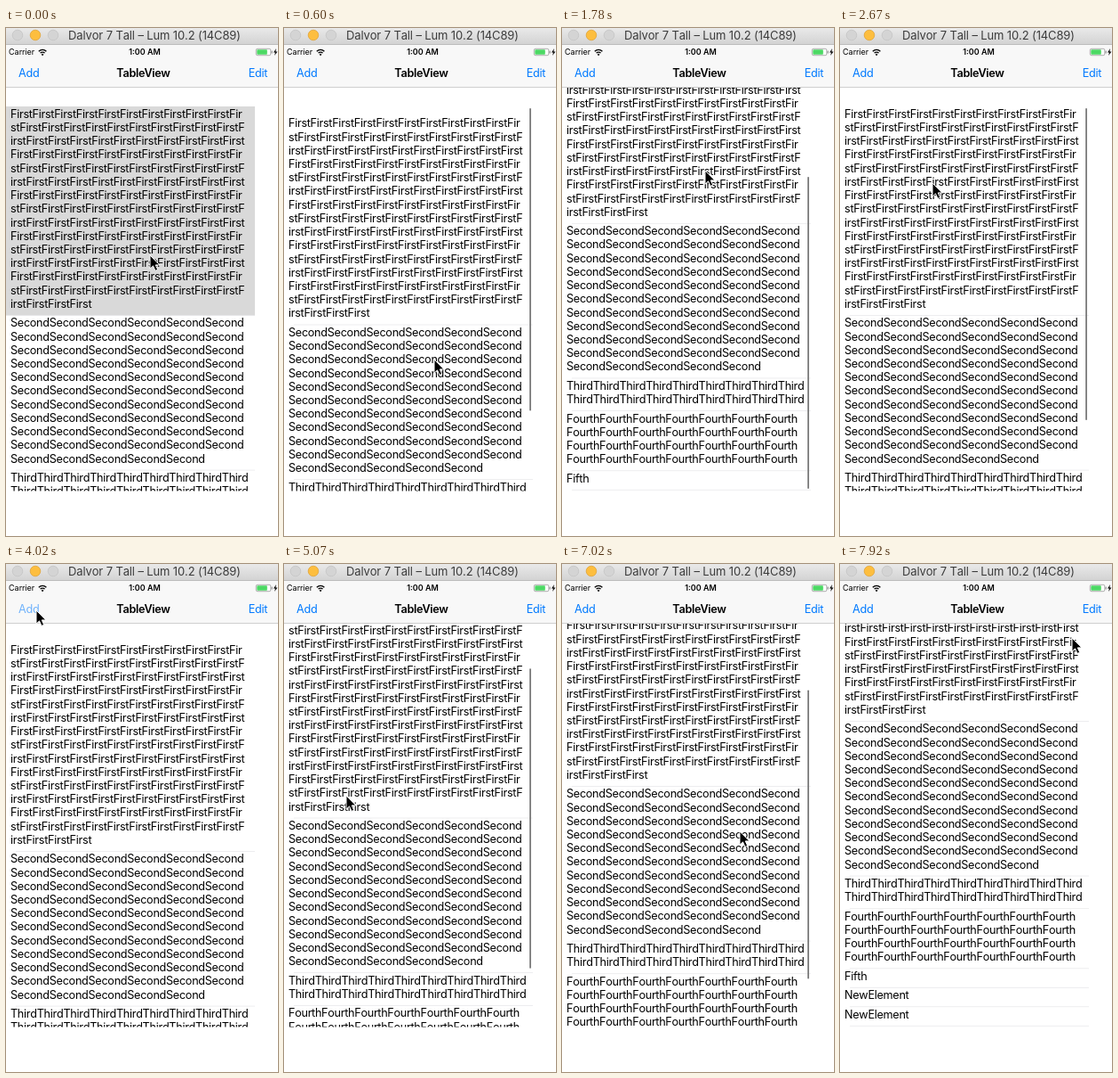
An HTML page that plays this animation: 306x570 px, repeating every 8 s.

```html
<!DOCTYPE html>
<html lang="en">
<head>
<meta charset="utf-8">
<title>TableView</title>
<style>
  html, body { margin: 0; width: 100%; height: 100%; overflow: hidden; background: #fff; }
  svg { display: block; width: 306px; height: 570px; }
  text { font-family: Inter, "Open Sans", sans-serif; font-size: 12.7px; letter-spacing: -0.025em; font-kerning: none; fill: #000; }
  .blue { fill: #007aff; }
  .small { font-size: 9px; letter-spacing: 0; }
  .title { font-size: 13px; letter-spacing: -0.01em; fill: #3c3c3c; }
</style>
</head>
<body>
<svg viewBox="0 0 306 570">
  <defs>
    <linearGradient id="chrome" x2="0" y2="1">
      <stop stop-color="#e9e9e9"/><stop offset="1" stop-color="#d2d2d2"/>
    </linearGradient>
    <clipPath id="viewport"><rect y="67" width="306" height="452.5"/></clipPath>
  </defs>
  <rect width="306" height="570" fill="#fff"/>

  <g clip-path="url(#viewport)">
    <g id="table"></g>
    <rect id="indicator" x="276.2" width="1.75" rx="0.8" fill="#777"/>
  </g>

  <rect y="19" width="306" height="47" fill="#f8f8f8"/>
  <rect y="66" width="306" height="1" fill="#cfcfcf"/>
  <rect width="306" height="19" fill="url(#chrome)"/>
  <rect y="18" width="306" height="1" fill="#bcbcbc"/>
  <g stroke-width="0.7">
    <circle cx="13" cy="8" r="5.8" fill="#d4d4d4" stroke="#c2c2c2"/>
    <circle cx="33" cy="8" r="5.8" fill="#fdbe3f" stroke="#dfa032"/>
    <circle cx="53" cy="8" r="5.8" fill="#d4d4d4" stroke="#c2c2c2"/>
  </g>
  <text class="title" x="167" y="13" text-anchor="middle">Dalvor 7 Tall – Lum 10.2 (14C89)</text>

  <text class="small" x="3" y="30.3">Carrier</text>
  <g fill="none" stroke="#000" stroke-width="1.3">
    <path d="M36.8 26.2a6 6 0 0 1 8.6 0M38.6 28.1a3.5 3.5 0 0 1 5 0"/>
    <circle cx="41.1" cy="29.8" r="0.5"/>
  </g>
  <text class="small" x="156" y="30.3" text-anchor="middle" font-weight="600">1:00 AM</text>
  <rect x="281.3" y="23.3" width="16.5" height="7.4" rx="1.6" fill="#fff" stroke="#777" stroke-width="0.6"/>
  <rect x="282.3" y="24.3" width="11.5" height="5.4" rx="0.8" fill="#4cd964"/>
  <rect x="298.6" y="25.6" width="1" height="2.8" rx="0.5" fill="#777"/>
  <path d="M304 23l-3 4.5h2l-1 3.5 3.4-4.6h-2.1z"/>

  <text id="add" class="blue" x="14" y="55.2">Add</text>
  <text x="154.5" y="55.2" text-anchor="middle" font-weight="600" style="font-kerning:normal">TableView</text>
  <text class="blue" x="294" y="55.2" text-anchor="end">Edit</text>

  <path id="pointer" d="M0 0V15.2L3.5 11.9L6 17.4L8.7 16.2L6.3 10.9H11Z" stroke="#fff" stroke-linejoin="round"/>
</svg>
<script>
const $ = id => document.getElementById(id);
const TOP = 88, BOTTOM = 518.4, LINE = 15.22, PAD = 6.25, LOOP = 8000;

// word, repetitions, characters per line (cycled)
const rows = [
  ['First', 153, [53, 53, 54]],
  ['Second', 65, [36]],
  ['Third', 18, [45]],
  ['Fourth', 28, [42]],
  ['Fifth', 1, [5]],
  ['NewElement', 1, [10]],
  ['NewElement', 1, [10]]
];

function node(parent, tag, attrs) {
  const el = document.createElementNS('http://www.w3.org/2000/svg', tag);
  set(el, attrs);
  return parent.appendChild(el);
}

function set(el, attrs) {
  for (const key in attrs) el.setAttribute(key, attrs[key]);
}

function wrap(word, count, lengths) {
  const lines = [];
  for (let rest = word.repeat(count); rest;) {
    const n = lengths[lines.length % lengths.length];
    lines.push(rest.slice(0, n));
    rest = rest.slice(n);
  }
  return lines;
}

let height = 0;
const cells = rows.map(row => {
  const lines = wrap(...row), h = lines.length * LINE + PAD;
  const group = node($('table'), 'g', { transform: `translate(0 ${height})` });
  const back = node(group, 'rect', { width: 280, height: h, fill: 'none' });
  lines.forEach((line, i) => {
    node(group, 'text', { x: 5, y: 12.8 + i * LINE }).textContent = line;
  });
  node(group, 'rect', { x: 11, y: h - 0.5, width: 269, height: 0.7, fill: '#e6e6e8' });
  height += h;
  return { group, back, end: height };
});

const clamp = v => Math.min(1, Math.max(0, v));
const ease = f => (1 - Math.cos(Math.PI * f)) / 2;
const ramp = (t, from, to) => ease(clamp((t - from) / (to - from)));
const bump = (t, from, to) => Math.sin(Math.PI * clamp((t - from) / (to - from)));
const within = (t, from, to) => t >= from && t < to;

function stepAt(ms) {
  const step = ms < 3720 ? (ms + 8) / 148.75 : 25 + (ms - 3720) / 150;
  return Math.floor(step);
}

// Turning points of the pointer: step, x, y
const turns = [
  [0, 162, 255], [4, 169, 372], [6, 163, 29], [12, 161, 160], [15, 140, 330], [18, 104, 174],
  [27, 34, 52], [34, 70, 260], [39, 21, 23], [43, 34, 52], [47, 200, 300], [53, 261, 83]
];

function pointerAt(step) {
  const next = Math.max(1, turns.findIndex(turn => turn[0] >= step));
  const [from, x0, y0] = turns[next - 1], [to, x1, y1] = turns[next];
  const f = ramp(step, from, to);
  return [x0 + (x1 - x0) * f, y0 + (y1 - y0) * f];
}

function draw(ms) {
  const step = stepAt(ms);
  const count = step < 28 ? 5 : step < 43 ? 6 : 7;
  const lowest = BOTTOM - TOP - cells[Math.min(count, 6) - 1].end - ramp(step, 42, 44) * (LINE + PAD);

  // 0 is the top of the list, 1 its end
  const progress = ramp(step, 5, 8) - ramp(step, 12, 18) + ramp(step, 28, 30)
    - 0.7 * bump(step, 32, 36) - 0.5 * bump(step, 45, 49);
  const pull = 15 * bump(step, 1, 5);

  set($('table'), { transform: `translate(0 ${TOP + progress * lowest + pull})` });
  cells.forEach((cell, i) => set(cell.group, { visibility: i < count ? 'visible' : 'hidden' }));
  set(cells[0].back, { fill: step < 1 ? '#d9d9d9' : 'none' });

  const size = 434 * (BOTTOM - TOP) / cells[count - 1].end - pull;
  const shown = (from, to) => ramp(step, from, from + 1) - ramp(step, to, to + 2);
  set($('indicator'), {
    y: 90 + progress * (427 - size),
    height: size,
    opacity: shown(1, 18) + shown(31, 37) + shown(44, 51)
  });

  const pressed = within(step, 26, 28) || within(step, 41, 43);
  set($('add'), { opacity: pressed ? 0.55 : 1 });
  set($('pointer'), { transform: `translate(${pointerAt(step)})` });
}

const start = performance.now();
function tick() {
  draw((performance.now() - start) % LOOP);
  requestAnimationFrame(tick);
}
tick();
</script>
</body>
</html>
```
